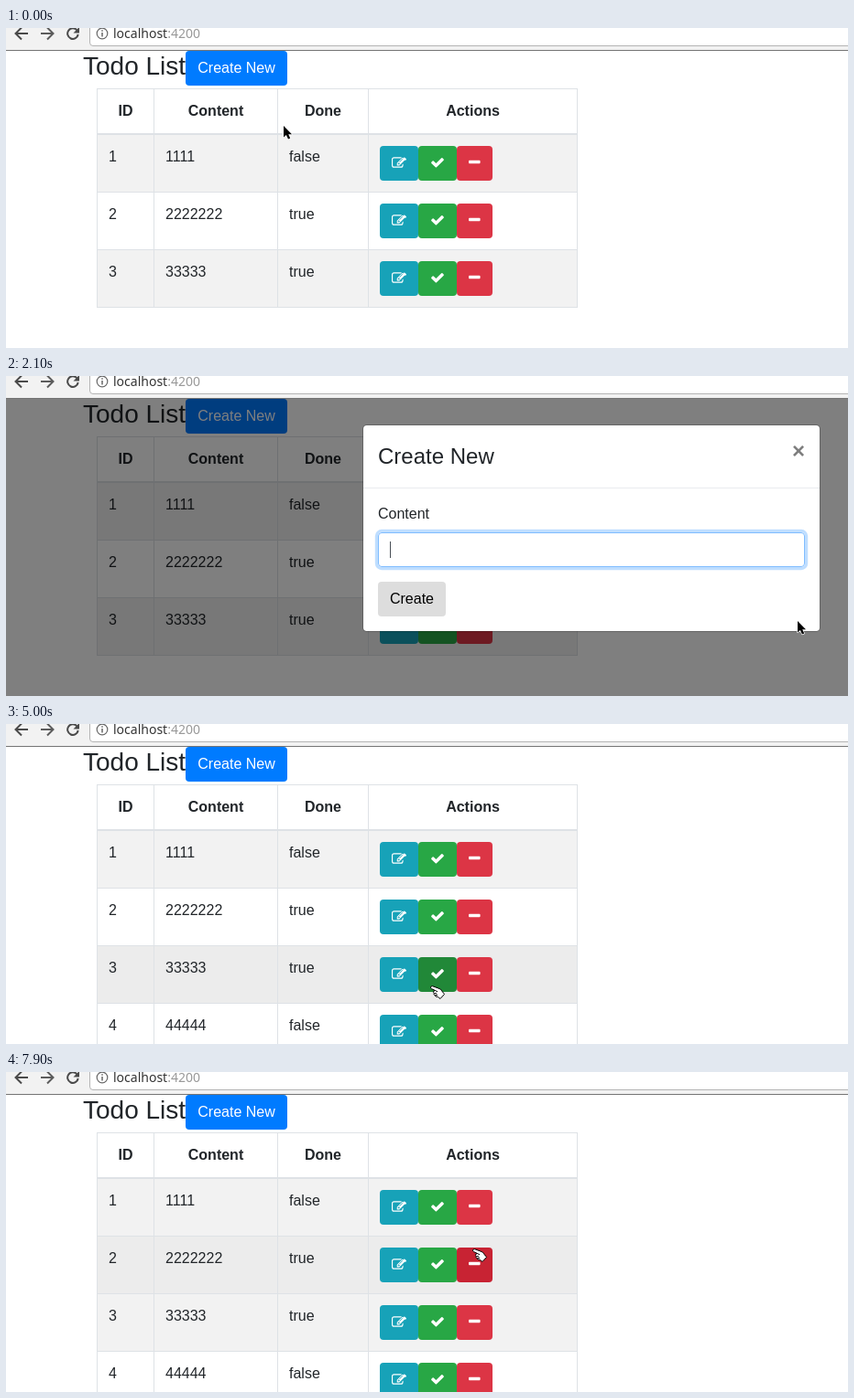
An HTML page for the animation above (8000 ms loop, 919 by 350 pixels).

```html
<!DOCTYPE html>
<html lang="en">
<head>
<meta charset="utf-8">
<title>Todo List</title>
<style>
html, body { margin: 0; width: 100%; height: 100%; overflow: hidden; background: #fff; }
body { position: relative; font: 16px/24px "Liberation Sans", Arial, sans-serif; color: #212529; }
div, svg, span.at { position: absolute; box-sizing: border-box; white-space: nowrap; }
#bar { left: 0; top: 0; width: 100%; height: 25px; background: #f2f2f2; border-bottom: 1px solid #747474; overflow: hidden; }
#url { left: 91px; top: -14px; width: 900px; height: 34px; background: #fff; border: 1px solid #b4b4b4; border-radius: 4px; }
#host { left: 117px; top: -6px; font: 14px/24px "Noto Sans", "Open Sans", sans-serif; color: #333; }
#host span { color: #999; }
#page { inset: 0; clip-path: inset(25px 0 0 0); }
#title { left: 84px; top: 25px; font-size: 28px; line-height: 33.6px; }
.btn { height: 38px; border-radius: 4px; color: #fff; text-align: center; line-height: 38px; }
#new { left: 196px; top: 25px; width: 111px; }
.line { background: #dee2e6; }
.th { font-weight: bold; text-align: center; top: 79px; }
.row { left: 100px; width: 523px; height: 62px; }
.row > span { position: absolute; top: 12px; }
#shade { inset: 25px 0 0 0; background: #000; }
#modal { left: 389px; top: 53px; width: 500px; height: 227px; background: #fff; background-clip: padding-box; border: 1px solid rgba(0,0,0,.2); border-radius: 4.8px; }
#head { left: 0; top: 0; width: 498px; height: 69px; border-bottom: 1px solid #e9ecef; }
#head span { position: absolute; left: 16px; top: 16px; font-size: 24px; line-height: 36px; }
#close { right: 16px; top: 16px; font-size: 24px; font-weight: bold; color: #000; opacity: .5; }
#label { left: 16px; top: 85px; }
#input { left: 16px; top: 117px; width: 466px; height: 38px; padding: 6px 12px; border: 1px solid #ced4da; border-radius: 4px; color: #495057; }
#caret { display: inline-block; width: 1px; height: 18px; background: #495057; vertical-align: -4px; }
#create { left: 16px; top: 171px; width: 74px; background: #ddd; color: #000; }
#cursor { left: 0; top: 0; width: 24px; height: 24px; overflow: visible; }
</style>
</head>
<body>
<div id="bar">
  <div id="url"></div>
  <svg width="120" height="24" fill="none" stroke="#4a4a4a" stroke-width="2">
    <path d="M24 6H11M17 -.5L10.500 6l6.500 6.500"/>
    <path stroke="#5c5c5c" d="M38 6h13M45 -.5L51.500 6l-6.500 6.500"/>
    <path d="M77.500 2.500A5.800 5.800 0 1 0 78.700 7"/>
    <path fill="#4a4a4a" stroke="none" d="M80 -1v6.500h-6.500z"/>
    <circle cx="105" cy="6" r="5.800" stroke="#666" stroke-width="1.200"/>
    <path stroke="#666" stroke-width="1.500" d="M105 5v4.500M105 2.300v1.500"/>
  </svg>
  <div id="host">localhost<span>:4200</span></div>
</div>

<div id="page">
  <div id="title">Todo List</div>
  <div id="new" class="btn">Create New</div>
  <div id="table"></div>
  <div id="shade"></div>
  <div id="modal">
    <div id="head"><span>Create New</span></div>
    <div id="close">×</div>
    <div id="label">Content</div>
    <div id="input"><span id="typed"></span><i id="caret"></i></div>
    <div id="create" class="btn">Create</div>
  </div>
</div>

<svg id="cursor" viewBox="0 0 24 24" stroke-linejoin="round">
  <path id="arrow" d="M0 0V12.500L2.900 10 5 14.600 7.200 13.600 5.200 9.200H9z" fill="#000" stroke="#fff" stroke-width="1.200" paint-order="stroke"/>
  <g id="hand" fill="#fff" stroke="#000">
    <path d="M.5 2Q.8 .4 2.500 .7L8 2.700Q12 3.500 13.500 7L15.500 9.500 11 14.500 8.500 12.500Q5.500 12.500 5 10.800 3.500 10 4.200 8.500 2.800 7.500 4 6L5.500 5.500 1.300 3.500Q.4 3 .5 2z"/>
    <path fill="none" d="M5.500 5.500L8 6.800M4.300 8.500L7.300 8.800M5.200 10.800L8 10.500"/>
  </g>
  <path id="beam" d="M-3 -8h2.500l.5 .5 .5-.5H3M0 -7.500V7.500M-3 8h2.500l.5-.5 .5 .5H3" fill="none" stroke="#000"/>
</svg>

<script>
const $ = id => document.getElementById(id);
const LOOP = 8000, STEP = 100;

// time, x, y of the pointer
const path = [
  [100, 303, 107], [600, 279, 43], [800, 276, 36], [900, 280, 42], [1000, 303, 72],
  [1100, 353, 107], [1700, 790, 190], [1900, 790, 190], [2100, 864, 268], [3200, 864, 268],
  [3500, 452, 251], [3700, 452, 251], [3800, 449, 247], [4300, 449, 247], [4400, 451, 250],
  [4800, 451, 250], [5200, 474, 322], [5400, 506, 328], [5600, 511, 290], [5700, 508, 268],
  [5800, 496, 238], [6100, 474, 210], [6300, 500, 218], [6600, 476, 268], [6900, 500, 195],
  [7000, 508, 174], [7300, 508, 174], [7600, 510, 200], [7900, 509, 193]
];
// time, backdrop opacity, dialog opacity, dialog offset
const fades = [
  [0, 0, 0, 0], [800, .11, 0, 0], [900, .44, .15, -49], [1000, .5, .85, -18], [1100, .5, 1, -5],
  [1200, .5, 1, 0], [4200, .5, 0, 0], [4400, .25, 0, 0], [4600, 0, 0, 0]
];
const rows = [['1', '1111', 'false'], ['2', '2222222', 'true'], ['3', '33333', 'true'], ['4', '44444', 'false']];
const cols = [99, 161, 296, 395, 623];
const icons = [
  { x: 408, w: 42, iw: 16, base: [23, 162, 184], over: [19, 132, 150],
    d: 'M10.900 2.500Q10.500 2.290 10 2.290H2.570A2.570 2.570 0 0 0 0 4.860v6.280a2.570 2.570 0 0 0 2.570 2.570H10a2.570 2.570 0 0 0 2.570-2.570V9.400L11.430 10.500v.64A1.430 1.430 0 0 1 10 12.570H2.570a1.430 1.430 0 0 1-1.430-1.430V4.860A1.430 1.430 0 0 1 2.570 3.430H10z' +
       'M11.710 2.860l2.570 2.570-6 6H5.710V8.860zM7.930 10.570l1.040-1.040-1.360-1.360-1.040 1.040v.5h.86v.86zM11.600 4.100L8.200 7.500l.4.4L12 4.500z' +
       'M15.680 5.250l-.82.82-2.570-2.570.82-.82q.6-.5 1.210 0l1.360 1.360q.5.600 0 1.210z' },
  { x: 450, w: 42, iw: 16, base: [40, 167, 69], over: [33, 136, 56],
    d: 'M14.900 5.050q0 .36-.25.610L6.970 13.340q-.6.500-1.210 0L1.310 8.890q-.5-.6 0-1.210l1.210-1.210q.6-.5 1.210 0L6.360 9.100 12.220 3.230q.6-.5 1.210 0l1.210 1.210q.26.250.26.610z' },
  { x: 492, w: 39, iw: 12.57, base: [220, 53, 69], over: [200, 35, 51],
    d: 'M.86 5.710H11.710a.86.860 0 0 1 .86.860V8.290a.86.860 0 0 1-.86.860H.86A.86.860 0 0 1 0 8.290V6.570a.86.860 0 0 1 .86-.86z' }
];

function box(parent, cls, css, html = '') {
  const el = document.createElement('div');
  el.className = cls;
  for (const k in css) el.style[k] = css[k] + 'px';
  el.innerHTML = html;
  parent.append(el);
  return el;
}
const rowTop = i => 117 + 63 * i;
const table = $('table');
const buttons = [];

const rowEls = rows.map((cells, i) => {
  const text = cells.map((c, k) => `<span style="left:${cols[k] - 87}px">${c}</span>`).join('');
  const row = box(table, 'row', { top: rowTop(i) }, text);
  icons.forEach((b, k) => {
    const svg = `<svg style="left:${(b.w - b.iw) / 2}px;top:10.300px" width="16" height="16"><path fill="#fff" fill-rule="evenodd" d="${b.d}"/></svg>`;
    const el = box(row, 'btn', { left: b.x - 100, top: 12, width: b.w }, svg);
    buttons.push({ el, ...b, y: rowTop(i) + 12, key: `${i}-${k}` });
  });
  return row;
});
['ID', 'Content', 'Done', 'Actions'].forEach((h, i) =>
  box(table, 'th', { left: cols[i] + 1, width: cols[i + 1] - cols[i] - 1 }, h));
box(table, 'line', { left: 99, top: 66, width: 525, height: 1 });
box(table, 'line', { left: 99, top: 115, width: 525, height: 2 });
for (let i = 1; i < 4; i++) box(table, 'line', { left: 99, top: rowTop(i) - 1, width: 525, height: 1 });
const posts = cols.map(x => box(table, 'line', { left: x, top: 66, width: 1 }));
buttons.push({ el: $('new'), x: 196, w: 111, y: 25, base: [0, 123, 255], over: [0, 105, 217], key: 'new' });

const fadeAt = t => fades.findLast(f => f[0] <= Math.max(t, 0));

function pointer(t) {
  const i = path.findIndex(p => p[0] >= t);
  if (i <= 0) return path[i < 0 ? path.length - 1 : 0].slice(1);
  const [t0, x0, y0] = path[i - 1], [t1, x1, y1] = path[i];
  const k = (t - t0) / (t1 - t0);
  return [Math.round(x0 + (x1 - x0) * k), Math.round(y0 + (y1 - y0) * k)];
}
const inside = (x, y, l, t, w, h) => x >= l && x < l + w && y >= t && y < t + h;

// what lies under the pointer: table row, button key, or dialog part
function hit(t) {
  const [x, y] = pointer(t), [, shade, dialog] = fadeAt(t);
  if (shade) {
    if (dialog < 1) return {};
    return { field: inside(x, y, 406, 171, 466, 38), key: inside(x, y, 406, 225, 74, 38) ? 'create' : '' };
  }
  const b = buttons.find(b => inside(x, y, b.x, b.y, b.w, 38));
  const row = rows.findIndex((r, i) => inside(x, y, 100, rowTop(i), 523, 62));
  return { row, key: b && b.key };
}

function draw(t) {
  const now = hit(t), before = hit(t - STEP);
  const [, shade, dialog, shift] = fadeAt(t);
  const full = t >= 4200;

  rowEls.forEach((el, i) => {
    el.style.background = before.row === i ? '#ececec' : i % 2 ? '#fff' : '#f2f2f2';
  });
  rowEls[3].style.display = full ? '' : 'none';
  posts.forEach(p => p.style.height = (full ? 290 : 240) + 'px');
  for (const b of buttons) {
    const k = ((now.key === b.key) + (before.key === b.key)) / 2;
    b.el.style.background = `rgb(${b.base.map((c, i) => c + (b.over[i] - c) * k)})`;
  }
  if (t >= 700 && t < 900) $('new').style.background = '#0062cc';

  $('shade').style.opacity = shade;
  $('modal').style.opacity = dialog;
  $('modal').style.transform = `translateY(${shift}px)`;

  const focus = t >= 1900 && t < 3800;
  const ring = a => `0 0 0 3.200px rgba(0,123,255,${a})`;
  $('input').style.borderColor = focus ? '#80bdff' : '#ced4da';
  $('input').style.boxShadow = focus ? ring(t < 2000 ? .12 : .25) : 'none';
  $('create').style.boxShadow = t >= 3800 ? ring(.25) : 'none';
  $('typed').textContent = '4'.repeat(Math.max(0, Math.min(5, (t - 2700) / STEP)));
  $('caret').style.visibility = focus && t < 3500 ? 'inherit' : 'hidden';

  const [x, y] = pointer(t);
  const shape = now.key ? 'hand' : now.field ? 'beam' : 'arrow';
  for (const s of ['arrow', 'hand', 'beam']) $(s).style.display = s === shape ? '' : 'none';
  $('cursor').style.transform = `translate(${x}px,${y}px)`;
}

function tick() {
  draw(Math.floor(performance.now() % LOOP / STEP) * STEP);
  requestAnimationFrame(tick);
}
tick();
</script>
</body>
</html>
```
